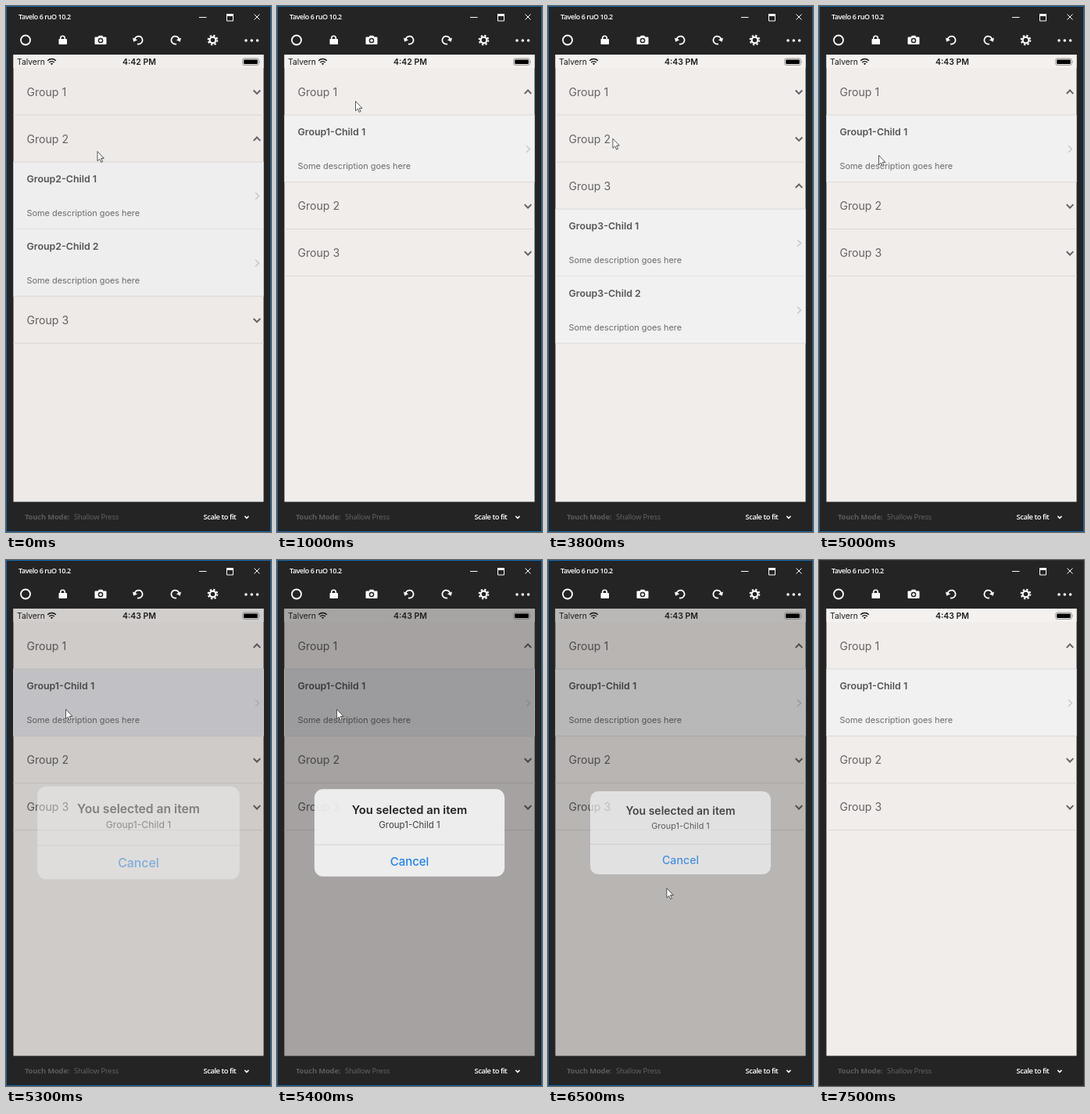
Write an HTML page that moves like this. It is 339 px wide and 671 px high and loops after 7.6 s.

```html
<!DOCTYPE html>
<html lang="en">
<head>
<meta charset="utf-8">
<title>Grouped list</title>
<style>
  html, body { margin: 0; width: 100%; height: 100%; overflow: hidden; background: #242424; }
  svg { display: block; width: 100vw; height: 100vh; }
  .ios { font-family: Inter, sans-serif; }
  .win { font-family: "Open Sans", sans-serif; font-size: 9.4px; }
  .mid { text-anchor: middle; }
  .group { font-size: 14.1px; fill: #656363; }
  .title { font-size: 12.4px; font-weight: 600; fill: #555; }
  .desc { font-size: 10.9px; fill: #6c6c6c; }
  .line { stroke: #dcd8d7; stroke-width: 1; }
  .stroke { fill: none; stroke: #fff; }
</style>
</head>
<body>
<svg viewBox="0 0 339 671" xmlns="http://www.w3.org/2000/svg">
  <rect width="339" height="671" fill="#242424"/>

  <g class="win" fill="#fff">
    <text x="16" y="17" font-size="9" font-weight="600" letter-spacing="-.45">Tavelo 6 ruO 10.2</text>
    <text x="24" y="655" font-weight="700" fill="#5c5c5c" letter-spacing="-.15">Touch Mode:</text>
    <text x="87" y="655" fill="#666" letter-spacing="-.2">Shallow Press</text>
    <text x="252.5" y="655" font-weight="600" letter-spacing="-.45">Scale to fit</text>
  </g>

  <g class="stroke" stroke-width="1">
    <path d="M247 14.5h9.500M282.500 11v8h8v-8M317.500 10.500l7 7m0-7l-7 7"/>
    <path d="M282 11.500h9" stroke-width="3"/>
    <path d="M305.300 650.800l2.600 2.600 2.600-2.600" stroke-width="1.600"/>
  </g>

  <g class="stroke" stroke-width="1.800">
    <circle cx="25" cy="43.500" r="6"/>
    <path d="M69.700 43v-2a2.800 2.800 0 0 1 5.600 0v2" stroke-width="1.600"/>
    <path d="M164.700 42.500a5 5 0 1 1 3.300 5.800M221.300 42.500a5 5 0 1 0-3.300 5.800"/>
    <circle cx="264.500" cy="43.500" r="3.900" stroke-width="2.200"/>
    <circle cx="264.500" cy="43.500" r="5.900" stroke-width="1.900" stroke-dasharray="2.320 2.314"/>
  </g>
  <g fill="#fff">
    <rect x="67.500" y="42" width="10.500" height="7" rx=".8"/>
    <path d="M162 40.500l1.200 5.200 5-2.400zM224 40.500l-1.200 5.200-5-2.400z"/>
    <path d="M114.500 39.500h3l1.300-1.700h4.400l1.300 1.700h3q1 0 1 1v7.500q0 1-1 1h-13q-1 0-1-1v-7.500q0-1 1-1z"/>
    <circle cx="307" cy="44" r="1.800"/><circle cx="314.300" cy="44" r="1.800"/><circle cx="321.600" cy="44" r="1.800"/>
  </g>
  <circle cx="121" cy="44" r="2.600" fill="#fff" stroke="#242424" stroke-width="1.500"/>

  <rect x="9.500" y="62" width="320" height="570.500" fill="#f1edeb"/>
  <rect x="9.500" y="62" width="320" height="17" fill="#f4f1ef"/>
  <g class="ios" id="list"></g>
  <rect id="dim" x="9.500" y="62" width="320" height="570.500"/>

  <g class="ios" fill="#1c1c1c">
    <text x="14" y="75" font-size="10.300">Talvern</text>
    <text class="mid" id="clock" x="170.500" y="75" font-size="10.500" font-weight="600"></text>
    <g fill="none" stroke="#111" stroke-width="1.500">
      <path d="M53.200 69.800a7.500 7.500 0 0 1 10.600 0M55.200 72a4.700 4.700 0 0 1 6.600 0"/>
      <rect x="302.800" y="67" width="20.400" height="8.400" rx="2" stroke="#777" stroke-width=".8"/>
    </g>
    <path d="M56.900 73.400a2.300 2.300 0 0 1 3.200 0l-1.600 1.800z"/>
    <rect x="304.200" y="68.400" width="17.600" height="5.600" rx="1" fill="#000"/>
    <path d="M324.300 69.800q1.300 1.400 0 2.800z" fill="#777"/>
  </g>

  <g class="ios mid" id="alert">
    <rect x="-115.500" y="-53" width="231" height="106" rx="10.500" fill="#f8f8f8"/>
    <path class="line" d="M-115.500 14.500h231"/>
    <text y="-22.700" font-size="14" font-weight="600" fill="#111">You selected an item</text>
    <text y="-5.500" font-size="10.900" fill="#333">Group1-Child 1</text>
    <text y="39.700" font-size="14.200" font-weight="500" fill="#0f7ff5">Cancel</text>
  </g>

  <path id="cursor" d="M.5.5v12.200l2.800-2.600 1.900 4.300 1.900-.8-1.900-4.200h3.700z" fill="#fff" stroke="#444" stroke-width=".9"/>
  <rect id="border" x=".5" y=".5" width="338" height="670" fill="none" stroke="#1467b0"/>
</svg>

<script>
const LOOP = 7600, STEP = 100;
const HEAD = 60, ROW = 85.6, TOP = 79;
const CHILDREN = [1, 2, 2];

// [time, open group], 0 = all closed
const OPEN = [[0, 2], [800, 0], [1000, 1], [2100, 0], [2200, 2], [2800, 0], [2900, 3], [4300, 1]];

// [time, x, y] of the pointer tip
const POINTER = [
  [400, 116.500, 185], [700, 100, 121], [1300, 100, 121], [1500, 85, 229],
  [1600, 85, 229], [1800, 85, 237], [2200, 85, 237], [2600, 74.500, 392],
  [3300, 74.500, 392], [3900, 84, 124], [4800, 84, 124], [5000, 76, 190],
  [5500, 76, 190], [6000, 172.500, 385], [6400, 172.500, 385],
  [7000, 46, 584], [7200, 21, 647]
];

// [time, value] of the alert's opacity and scale
const FADE = [[5200, 0], [5300, .4], [5400, .88], [5600, 1], [6400, 1], [6700, 0]];
const SCALE = [[5300, 1.12], [5400, 1.053], [5500, 1.015], [5600, 1]];
const PRESS = [[5200, 0], [5300, 1], [5400, .8], [5700, 0]];

const $ = id => document.getElementById(id);
const set = (id, attrs) => {
  for (const key in attrs) $(id).setAttribute(key, attrs[key]);
};

function tween(keys, t, col = 1) {
  const i = keys.findIndex(k => k[0] > t);
  if (i < 0) return keys[keys.length - 1][col];
  if (i === 0) return keys[0][col];
  const a = keys[i - 1], b = keys[i];
  return a[col] + (b[col] - a[col]) * (t - a[0]) / (b[0] - a[0]);
}

const held = (keys, t) => keys.filter(k => k[0] <= t).pop()[1];
const line = y => `<path class="line" d="M9.500 ${y}h320"/>`;
const label = (cls, y, text) => `<text class="${cls}" x="26.500" y="${y}">${text}</text>`;

function header(n, y, open) {
  const d = open ? -2.2 : 2.2;
  return label("group", y + 35.5, `Group ${n}`) +
    `<path d="M316.700 ${y + 30.7 - d}l4.300 ${2 * d} 4.300 ${-2 * d}" fill="none" stroke="#656363" stroke-width="2"/>` +
    line(y + HEAD);
}

function child(n, i, y, press) {
  return `<rect x="9.500" y="${y}" width="320" height="${ROW}" fill="#f1f1f1"/>` +
    `<rect x="9.500" y="${y}" width="320" height="${ROW}" fill="#e2e2e6" opacity="${press}"/>` +
    label("title", y + 26.2, `Group${n}-Child ${i}`) +
    label("desc", y + 69.4, "Some description goes here") +
    `<path d="M319 ${y + 39.2}l4.500 4.300-4.500 4.300" fill="none" stroke="#c9c9cb" stroke-width="1.500"/>` +
    line(y + ROW);
}

function list(open, press) {
  let y = TOP, out = "";
  CHILDREN.forEach((count, g) => {
    const n = g + 1;
    let rows = "";
    const head = header(n, y, n === open);
    y += HEAD;
    if (n === open) {
      for (let i = 1; i <= count; i++, y += ROW) rows += child(n, i, y, press);
    }
    out += rows + head;
  });
  return out;
}

let shown = "";
function draw(t) {
  const markup = list(held(OPEN, t), tween(PRESS, t));
  if (markup !== shown) $("list").innerHTML = shown = markup;

  const fade = tween(FADE, t);
  $("clock").textContent = t < 3600 ? "4:42 PM" : "4:43 PM";
  set("dim", { opacity: t < 500 ? .01 : .36 * fade });
  set("alert", { opacity: fade, transform: `translate(169.500 348) scale(${tween(SCALE, t)})` });
  set("cursor", {
    transform: `translate(${tween(POINTER, t)} ${tween(POINTER, t, 2)})`,
    visibility: t < 7500 ? "visible" : "hidden"
  });
  set("border", { stroke: t < 7500 ? "#1467b0" : "#2e2e2e" });
}

const start = performance.now();
function tick() {
  const t = (performance.now() - start) % LOOP;
  draw(Math.floor(t / STEP) * STEP);
  requestAnimationFrame(tick);
}
tick();
</script>
</body>
</html>
```
